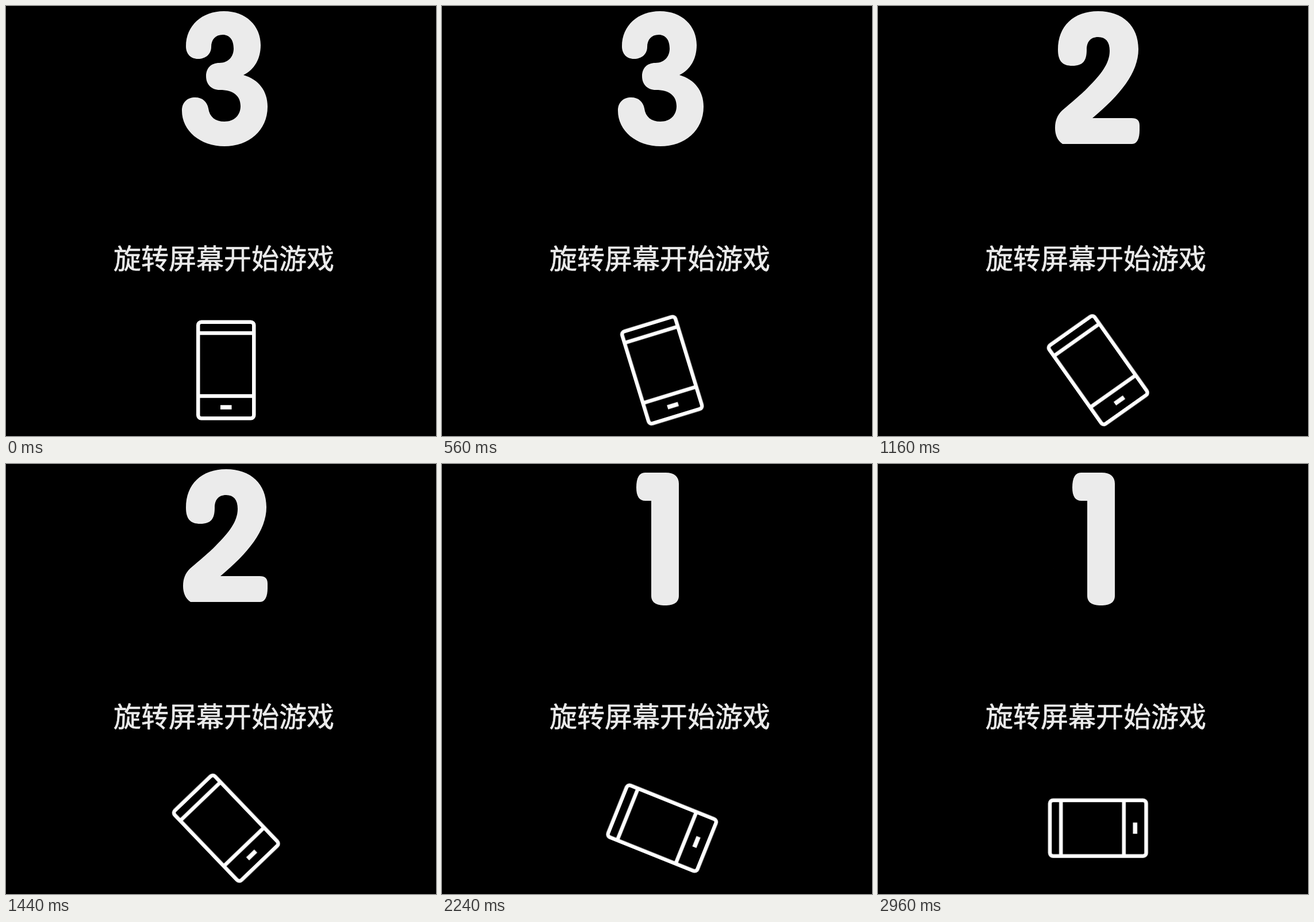
Recreate the animation shown at these times as an HTML page. Size 748 px wide and 748 px high, loop 3 s.

```html
<!DOCTYPE html>
<html lang="zh-CN">
<head>
<meta charset="utf-8">
<title>旋转屏幕开始游戏</title>
<style>
  html, body {
    margin: 0;
    width: 100%;
    height: 100%;
    overflow: hidden;
    background: #000;
  }

  svg {
    display: block;
    width: 100%;
    height: 100%;
  }

  .digit {
    fill: #ebebeb;
    animation: show 3s step-end infinite;
  }

  .two { animation-delay: -2s; }
  .one { animation-delay: -1s; }

  .prompt {
    fill: #ebebeb;
    stroke: #ebebeb;
    stroke-width: .7;
    stroke-linejoin: round;
    font: 400 48px "Noto Sans CJK SC", "Noto Sans CJK", sans-serif;
  }

  .phone {
    fill: none;
    stroke: #fff;
    stroke-width: 6.5;
    transform-origin: 382.75px 633.5px;
    animation: turn 3s steps(75, jump-none) infinite;
  }

  .button {
    fill: #fff;
    stroke: none;
  }

  /* each digit holds for one third of the loop */
  @keyframes show {
    0% { visibility: visible; }
    33.3333%, 100% { visibility: hidden; }
  }

  @keyframes turn {
    from { transform: rotate(0deg); }
    to { transform: rotate(-90deg); }
  }
</style>
</head>
<body>
<svg viewBox="0 0 748 748">
  <path class="digit three" d="M313 70C313 34 341 9 379 9C418 9 443 35 443 68C443 92 432 111 413 120
    C440 128 455 148 455 175C455 217 422 244 380 244C338 244 306 217 306 182C306 167 316 159 329 159
    C342 159 350 167 352 178C354 193 364 201 380 201C397 201 408 190 408 174C408 156 395 146 372 146
    C357 146 348 136 348 122C348 108 357 99 371 99C387 99 396 88 396 74C396 59 389 50 377 50
    C364 50 357 59 357 71C357 84 347 92 334 92C321 92 313 83 313 70Z"/>
  <path class="digit two" d="M313 76C313 35 340 9 383 9C426 9 453 35 453 75C453 116 421 155 373 195
    H441C451 195 455 199 455 208V216C455 230 451 240 442 240H321C312 234 308 224 308 212
    C308 199 312 190 320 182C341 164 352 155 364 143C388 119 403 100 403 78C403 62 396 54 383 54
    C369 54 363 63 363 76C363 95 357 104 338 104C321 104 313 96 313 76Z"/>
  <path class="digit one" d="M353 15H389C404 15 412 22 412 34V229C412 241 403 246 388 246
    C373 246 364 241 364 229V64H354C343 64 338 56 338 41C338 24 343 15 353 15Z"/>

  <text class="prompt" x="187" y="457">旋转屏幕开始游戏</text>

  <g class="phone">
    <rect x="334.25" y="549.75" width="97" height="167.5" rx="5.5"/>
    <path d="M334 569H431M334 678.5H431"/>
    <rect class="button" x="373" y="694.25" width="19.5" height="7.5"/>
  </g>
</svg>
</body>
</html>
```
